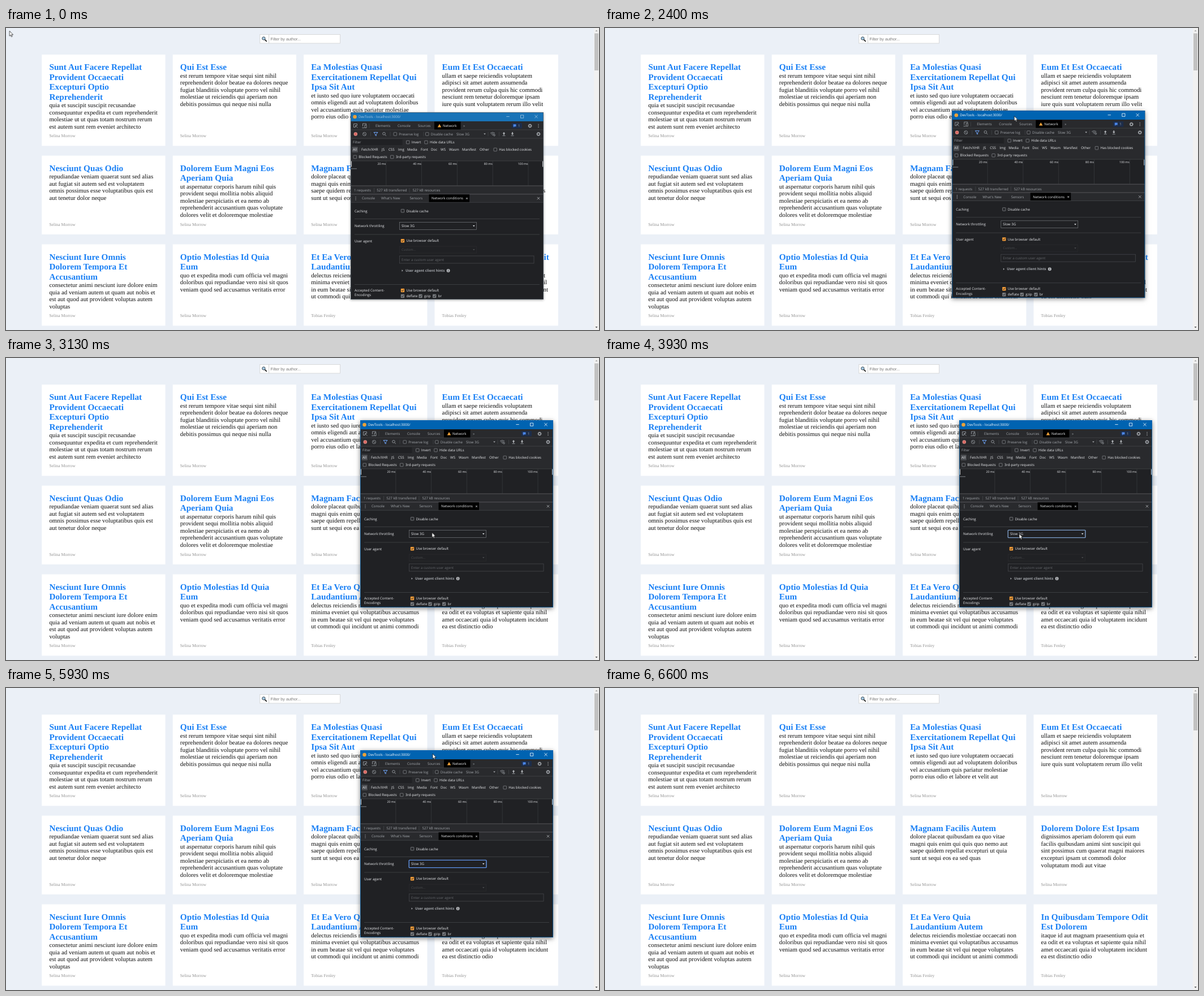
Recreate the animation shown at these times as an HTML page. Size 1048x534 px, loop 8 s.

```html
<!DOCTYPE html>
<html lang="en">
<head>
<meta charset="utf-8">
<title>Post list</title>
<style>
html, body { margin: 0; width: 100%; height: 100%; overflow: hidden; background: #ebf0f7; }
svg { position: absolute; left: 0; top: 0; display: block; }
text { text-rendering: geometricPrecision; white-space: pre; }

#page { font-family: "Liberation Serif", "Times New Roman", serif; }
.title { font-size: 15.28px; font-weight: bold; fill: #1a80f5; }
.body { font-size: 10.92px; fill: #111; }
.author { font-size: 7.7px; fill: #929292; }
.hint { font: 7.2px "Liberation Sans", Arial, sans-serif; fill: #777; }

#win, #win svg { width: 341px; height: 331px; }
#win { position: absolute; left: 609px; top: 149px; background: #202124; }
#win text { font: 6.15px "Open Sans", "Noto Sans", sans-serif; fill: #e8eaed; }
#win .dim { fill: #a3a7ac; }
#win .off { fill: #63666a; }
#win .it { fill: #4b4d50; font-style: italic; }
#win .bold { fill: #a3a7ac; font-weight: bold; }
#win .ms { font-size: 5.3px; text-anchor: end; }
#win .cap { fill: currentColor; }
.ico { fill: none; stroke: #a3a7ac; stroke-width: .8; }
.cur { position: absolute; left: 0; top: 0; width: 20px; height: 20px; overflow: visible; }

/* One tick is 1/120 of the loop (66.67 ms). */
#win, #bar, #frame, #ring, #list, #cursor, #arrow, #beam { animation: 8s step-end -5ms infinite; }
#win { animation-name: drag, glow; }
#bar { animation-name: caption; }
#frame { animation-name: frame; }
#ring { animation-name: ring; }
#list { animation-name: list; }
#cursor { animation-name: pointer; }
#arrow { animation-name: arrow; }
#beam { animation-name: beam; }

@keyframes drag {
  0% { transform: translate(0, 0); }
  28.333% { transform: translate(0, 0); animation-timing-function: steps(2); }
  30% { transform: translate(4.3px, -2.8px); animation-timing-function: steps(2); }
  31.667% { transform: translate(9px, -16px); animation-timing-function: steps(2); }
  33.333% { transform: translate(15px, -34px); }
  34.167% { transform: translate(17px, -39px); }
  77.5% { transform: translate(92px, -24px); }
  78.333% { transform: translate(197.7px, -16.2px); }
  79.167% { transform: translate(296px, -34px); }
  80% { transform: translate(376px, -60px); }
  80.833% { transform: translate(424px, -78px); }
  81.667% { transform: translate(437px, -84px); }
  82.5%, 100% { transform: translate(500px, -84px); }
}
@keyframes pointer {
  0% { transform: translate(6.2px, 5.2px); }
  3.333% { transform: translate(6.2px, 5.2px); animation-timing-function: steps(4); }
  6.667% { transform: translate(112px, 27px); animation-timing-function: steps(5); }
  10.833% { transform: translate(540px, 106px); animation-timing-function: steps(4); }
  14.167% { transform: translate(699px, 138px); }
  15% { transform: translate(701.5px, 143px); animation-timing-function: steps(2); }
  16.667% { transform: translate(692px, 156px); animation-timing-function: steps(5); }
  20.833% { transform: translate(908px, 159px); animation-timing-function: steps(4); }
  24.167% { transform: translate(719px, 158.4px); }
  28.333% { transform: translate(719px, 158.4px); animation-timing-function: steps(2); }
  30% { transform: translate(723.3px, 155.6px); animation-timing-function: steps(2); }
  31.667% { transform: translate(728px, 142.4px); animation-timing-function: steps(2); }
  33.333% { transform: translate(734px, 124.4px); }
  34.167% { transform: translate(736px, 119.4px); }
  35% { transform: translate(736px, 119.4px); animation-timing-function: steps(4); }
  38.333% { transform: translate(752px, 299px); }
  39.167% { transform: translate(752.8px, 308.5px); animation-timing-function: steps(6); }
  44.167% { transform: translate(741px, 317px); animation-timing-function: steps(5); }
  48.333% { transform: translate(732px, 310.8px); }
  67.5% { transform: translate(732px, 310.8px); animation-timing-function: steps(3); }
  70% { transform: translate(709px, 246px); animation-timing-function: steps(5); }
  74.167% { transform: translate(754px, 116.2px); }
  77.5% { transform: translate(829px, 131.2px); }
  78.333% { transform: translate(934.5px, 139px); }
  79.167% { transform: translate(1033px, 121px); }
  80%, 100% { transform: translate(1113px, 95px); }
}
@keyframes arrow { 0% { opacity: 1; } 13.333% { opacity: 0; } 16.667%, 100% { opacity: 1; } }
@keyframes beam { 0% { opacity: 0; } 13.333% { opacity: 1; } 16.667%, 100% { opacity: 0; } }
@keyframes caption { 0% { color: #a8cbe6; fill: #1973b7; } 28.333%, 100% { color: #fff; fill: #0063b1; } }
@keyframes frame { 0% { stroke: #56616b; } 28.333%, 100% { stroke: #0063b1; } }
@keyframes glow {
  0% { box-shadow: 0 1px 4px rgba(0, 0, 0, .4); }
  28.333%, 100% { box-shadow: 0 2px 8px rgba(0, 0, 0, .5); }
}
@keyframes ring {
  0% { stroke: transparent; }
  49.167% { stroke: #7d9fcb; }
  60.833%, 100% { stroke: #5f94ec; }
}
@keyframes list { 0% { opacity: 0; } 50% { opacity: .55; } 50.833% { opacity: 1; } 59.167%, 100% { opacity: 0; } }
</style>
</head>
<body>
<svg id="page" width="1048" height="534"></svg>
<div id="win"></div>
<div id="cursor" class="cur">
  <svg id="arrow" class="cur"><path d="M0 0V9L2 7.2 3.4 10.3 4.9 9.6 3.5 6.6H6.3Z" fill="#fff" stroke="#000" stroke-width=".7"/></svg>
  <svg id="beam" class="cur"><path d="M-2 -5H2M0 -5V5M-2 5H2" fill="none" stroke="#222" stroke-width=".8"/></svg>
</div>
<script>
const $ = id => document.getElementById(id);
const text = (x, y, s, cls = '') => `<text x="${x}" y="${y}" class="${cls}">${s}</text>`;
const rect = (x, y, w, h, fill, more = '') =>
  `<rect x="${x}" y="${y}" width="${w}" height="${h}" fill="${fill}" ${more}/>`;
const dot = (x, y, r, fill) => `<circle cx="${x}" cy="${y}" r="${r}" fill="${fill}"/>`;
const path = (d, more = 'class="ico"') => `<path d="${d}" ${more}/>`;
const solid = fill => `fill="${fill}"`;

// Page
const people = ['Selina Morrow', 'Tobias Fenley'];
const rows = [
  { y: 47, h: 161.4, cards: [
    ['Sunt Aut Facere Repellat|Provident Occaecati|Excepturi Optio|Reprehenderit', 'quia et suscipit suscipit recusandae|consequuntur expedita et cum reprehenderit|molestiae ut ut quas totam nostrum rerum|est autem sunt rem eveniet architecto', 0],
    ['Qui Est Esse', 'est rerum tempore vitae sequi sint nihil|reprehenderit dolor beatae ea dolores neque|fugiat blanditiis voluptate porro vel nihil|molestiae ut reiciendis qui aperiam non|debitis possimus qui neque nisi nulla', 0],
    ['Ea Molestias Quasi|Exercitationem Repellat Qui|Ipsa Sit Aut', 'et iusto sed quo iure voluptatem occaecati|omnis eligendi aut ad voluptatem doloribus|vel accusantium quis pariatur molestiae|porro eius odio et labore et velit aut', 0],
    ['Eum Et Est Occaecati', 'ullam et saepe reiciendis voluptatem|adipisci sit amet autem assumenda|provident rerum culpa quis hic commodi|nesciunt rem tenetur doloremque ipsam|iure quis sunt voluptatem rerum illo velit', 0]] },
  { y: 225.7, h: 139.3, cards: [
    ['Nesciunt Quas Odio', 'repudiandae veniam quaerat sunt sed alias|aut fugiat sit autem sed est voluptatem|omnis possimus esse voluptatibus quis est|aut tenetur dolor neque', 0],
    ['Dolorem Eum Magni Eos|Aperiam Quia', 'ut aspernatur corporis harum nihil quis|provident sequi mollitia nobis aliquid|molestiae perspiciatis et ea nemo ab|reprehenderit accusantium quas voluptate|dolores velit et doloremque molestiae', 0],
    ['Magnam Facilis Autem', 'dolore placeat quibusdam ea quo vitae|magni quis enim qui quis quo nemo aut|saepe quidem repellat excepturi ut quia|sunt ut sequi eos ea sed quas', 0],
    ['Dolorem Dolore Est Ipsam', 'dignissimos aperiam dolorem qui eum|facilis quibusdam animi sint suscipit qui|sint possimus cum quaerat magni maiores|excepturi ipsam ut commodi dolor|voluptatum modi aut vitae', 0]] },
  { y: 382.5, h: 143.9, cards: [
    ['Nesciunt Iure Omnis|Dolorem Tempora Et|Accusantium', 'consectetur animi nesciunt iure dolore enim|quia ad veniam autem ut quam aut nobis et|est aut quod aut provident voluptas autem|voluptas', 0],
    ['Optio Molestias Id Quia|Eum', 'quo et expedita modi cum officia vel magni|doloribus qui repudiandae vero nisi sit quos|veniam quod sed accusamus veritatis error', 0],
    ['Et Ea Vero Quia|Laudantium Autem', 'delectus reiciendis molestiae occaecati non|minima eveniet qui voluptatibus accusamus|in eum beatae sit vel qui neque voluptates|ut commodi qui incidunt ut animi commodi', 1],
    ['In Quibusdam Tempore Odit|Est Dolorem', 'itaque id aut magnam praesentium quia et|ea odit et ea voluptas et sapiente quia nihil|amet occaecati quia id voluptatem incidunt|ea est distinctio odio', 1]] },
];

function card(x, top, h, [title, body, who]) {
  const heads = title.split('|'), tx = x + 13.1, y = top + 27;
  const by = top + 13.1 + heads.length * 17.5 + 10;
  return rect(x, top, 218.3, h, '#fff') +
    heads.map((s, i) => text(tx, y + i * 17.5, s, 'title')).join('') +
    body.split('|').map((s, i) => text(tx, by + i * 12.55, s, 'body')).join('') +
    text(tx, top + h - 15, people[who], 'author');
}

$('page').innerHTML =
  rect(448.8, 11.4, 16, 15.6, '#fff', 'stroke="#ccc" stroke-width=".7"') +
  rect(464.8, 11.4, 125.6, 15.6, '#fff', 'stroke="#ccc" stroke-width=".7"') +
  path('M457.5 20.6L460.3 23.4', 'stroke="#222" stroke-width="1.8" stroke-linecap="round"') +
  '<circle cx="455.4" cy="18.4" r="2.7" fill="#a9cde8" stroke="#34444f" stroke-width="1"/>' +
  text(467.4, 21.8, 'Filter by author...', 'hint') +
  rows.map(r => r.cards.map((c, i) => card(63.3 + 231.4 * i, r.y, r.h, c)).join('')).join('') +
  rect(1039, 0, 9, 534, '#f1f1f1') + rect(1040, 9.5, 7, 65.5, '#c1c1c1') +
  path('M1041.5 6L1043.5 3.6 1045.5 6Z', solid('#a3a3a3')) +
  path('M1041.5 528L1043.5 530.4 1045.5 528Z', solid('#505050'));

// Tool window: y is the middle of the line of text
const label = (x, y, s, cls) => text(x, y + 2.2, s, cls);
const labels = (y, cls, ...items) => items.map(([x, s]) => label(x, y, s, cls)).join('');
const box = (x, y, mark = '') => mark
  ? rect(x - 3.2, y - 3.2, 6.4, 6.4, mark, 'rx="1"') +
    path(`M${x - 1.9} ${y}l1.4 1.5 2.4 -3`, 'fill="none" stroke="#202124" stroke-width="1"')
  : rect(x - 2.8, y - 2.8, 5.6, 5.6, '#292a2d', 'rx=".8" stroke="#8b8e92" stroke-width=".7"');
const check = (x, y, s, mark, cls) => box(x, y, mark) + label(x + 6.5, y, s, cls);
const line = (x1, y1, x2, y2, c = '#47494c') =>
  path(`M${x1} ${y1}L${x2} ${y2}`, `stroke="${c}" stroke-width=".7"`);
const seps = (y, ...xs) => xs.map(x => line(x, y - 4, x, y + 4)).join('');
const gear = (x, y) => `<g class="ico"><circle cx="${x}" cy="${y}" r="2.2" stroke-width="1.4"/>` +
  `<circle cx="${x}" cy="${y}" r="3.2" stroke-dasharray="1.25 1.26"/></g>`;
const dots = (x, y) => [-2.5, 0, 2.5].map(d => dot(x, y + d, .65, '#b5b8bc')).join('');
const cross = (x, y, r, c) => path(`M${x - r} ${y - r}l${2 * r} ${2 * r}m0 ${-2 * r}l${-2 * r} ${2 * r}`,
  `fill="none" stroke="${c}" stroke-width=".8"`);
const caret = (x, y, c) => path(`M${x - 1.8} ${y - 1}h3.6l-1.8 2.2Z`, solid(c));
const field = (x, y, w, h, c) => rect(x, y, w, h, '#202124', `stroke="${c}" stroke-width=".7"`);
const orange = '#f29b38', grey = '#76797d', pale = '#b5b8bc';

const caption = '<g id="bar">' + rect(0, 0, 341, 16, 'inherit').replace('fill="inherit"', '') +
  dot(7.5, 8, 3.3, '#e8a13a') + label(14, 7.8, 'DevTools - localhost:3000/', 'cap') +
  path('M275.3 7.6h5.4M300.5 5h5.2v5.2h-5.2ZM325.4 5l5.2 5.2m0 -5.2l-5.2 5.2',
    'fill="none" stroke="currentColor" stroke-width=".8"') + '</g>';

const tabs = rect(0, 16, 341, 114, '#292a2d') + line(0, 31, 341, 31) +
  path('M11.5 23.5v-3h-6v6h3M8.5 23.5l4 4m-4 -1.2v-2.8h2.8') +
  path('M21.5 25v-5h6v2M20.3 27.5h4M25 22.5h3v5h-3Z') + seps(24, 33) +
  labels(24, 'dim', [44, 'Elements'], [83, 'Console'], [119, 'Sources'], [199, '»']) +
  rect(148, 16.5, 46.5, 14, '#000') + path('M157 20.8l3.2 5.6h-6.4Z', solid('#f2a33a')) +
  label(163, 24, 'Network') +
  rect(284.5, 19, 18.5, 9.5, '#1d2d4a', 'rx="1.2"') +
  path('M287.5 21.3h5v4h-3l-1.5 1.5v-1.5h-.5Z', solid('#4b86e8')) + label(296, 23.9, '1', 'dim') +
  gear(317, 24) + dots(332, 24);

const tools = line(0, 46, 341, 46) + dot(8.8, 38.5, 3.2, '#e4908b') + dot(8.8, 38.5, 2.2, '#d8655f') +
  '<circle cx="24.5" cy="38.5" r="3" class="ico"/>' + path('M22.4 36.4l4.2 4.2') +
  seps(38.5, 35.5, 70, 129) +
  path('M41 35.5h7l-2.7 3.4v2.8l-1.6 -.8v-2Z', 'fill="none" stroke="#6ea3f5" stroke-width="1"') +
  '<circle cx="59" cy="37.8" r="2.3" class="ico"/>' + path('M60.6 39.5l2.4 2.4') +
  check(78.8, 38.5, 'Preserve log', '', 'dim') + check(135.3, 38.5, 'Disable cache', '', 'dim') +
  label(187, 38.5, 'Slow 3G', 'dim') + caret(237, 38.4, pale) + seps(38.5, 243, 262.5) +
  path('M247 37q4 -3 8 0M248.6 38.8q2.4 -1.8 4.8 0M250.2 40.4h1.6') +
  '<circle cx="254" cy="40.5" r="1.4" class="ico"/>' +
  path('M271 35l2.3 2.8h-1.5v2.4h-1.6v-2.4h-1.5ZM286 40.2l2.3 -2.8h-1.5v-2.4h-1.6v2.4h-1.5Z', solid(pale)) +
  path('M268.5 41.5h5M283.5 41.5h5') + gear(332, 38.5);

const filters = rect(2.5, 48, 89, 10, '#202124') + label(4, 53, 'Filter', 'dim') +
  check(101.3, 53, 'Invert') + check(133.5, 53, 'Hide data URLs') +
  rect(2.6, 61, 10.4, 10, '#4a4c50', 'rx="1.2"') +
  labels(66, '', [4, 'All'], [19, 'Fetch/XHR'], [55, 'JS'], [67, 'CSS'], [84, 'Img'], [100, 'Media'],
    [124, 'Font'], [142, 'Doc'], [159, 'WS'], [174, 'Wasm'], [197, 'Manifest'], [228, 'Other']) +
  seps(66, 16) + check(255.7, 66, 'Has blocked cookies') +
  check(7.8, 79, 'Blocked Requests') + check(73.3, 79, '3rd-party requests');

const chart = rect(0, 86, 341, 44, '#202124') + line(0, 86, 341, 86) +
  [1, 2, 3, 4, 5].map(i => line(62.8 * i, 86, 62.8 * i, 129.5, '#3c3e41') +
    text(62.8 * i - .5, 93.2, i * 20 + ' ms', 'ms')).join('') +
  rect(.8, 86.5, 1.2, 10, '#d5d7da') + rect(339, 86.5, 1.2, 10, '#d5d7da') +
  line(1, 99.8, 11, 99.8, '#a9adb2') +
  rect(0, 130, 341, 29.3, '#292a2d') + line(0, 130, 341, 130, '#6a6c6f') +
  labels(138.2, 'dim', [6, '1 requests'], [46.3, '527 kB transferred'], [109.5, '527 kB resources']) +
  seps(138.2, 41.5, 104);

const drawer = line(0, 144.8, 341, 144.8, '#6a6c6f') + dots(9, 152.3) +
  labels(152.2, 'dim', [20, 'Console'], [54, "What's New"], [104.5, 'Sensors']) +
  rect(138.5, 145.2, 71.5, 14, '#000') + label(143, 152.2, 'Network conditions') +
  cross(205.5, 152.4, 1.4, '#e8eaed') + cross(332, 152.2, 2.2, pale) + line(0, 159.3, 341, 159.3);

const panel = labels(174.5, '', [7, 'Caching']) + check(92, 174.3, 'Disable cache') +
  [188.5, 216, 304.5].map(y => line(7, y, 334, y)).join('') +
  label(7, 201, 'Network throttling') + field(86.5, 194.6, 136, 12.8, '#75787c') +
  rect(86.2, 194.3, 136.8, 13.4, 'none', 'id="ring" rx="1" stroke-width="1.3"') +
  label(90, 201, 'Slow 3G') + caret(217.8, 201, '#e8eaed') +
  label(7, 228, 'User agent') + check(92, 227.2, 'Use browser default', orange) +
  field(86.5, 237, 136, 12, '#2b2c2f') + label(90, 243, 'Custom...', 'it') + caret(217.8, 243, '#4b4d50') +
  field(86.5, 254, 237.5, 13, '#4a4c50') + label(90, 260.5, 'Enter a custom user agent', 'off') +
  path('M90.6 278.2l2 1.8 -2 1.8Z', solid(pale)) + label(97, 280, 'User agent client hints', 'bold') +
  dot(172.6, 280, 3, pale) + path('M172.6 279.5v2.2M172.6 277.8v.9', 'stroke="#202124" stroke-width=".9"') +
  label(7, 314.6, 'Accepted Content-') + label(7, 323.2, 'Encodings') +
  check(92, 315, 'Use browser default', orange) +
  [[92, 'deflate'], [123.5, 'gzip'], [148.2, 'br']].map(([x, s]) => check(x, 325, s, grey)).join('');

const options = ['Disabled', '  No throttling', 'Presets', '  Fast 3G', '  Slow 3G', '  Offline', 'Custom', '  Add...'];
const list = '<g id="list">' + field(86.5, 208, 136, 76, '#75787c') +
  rect(87, 246, 135, 9.5, '#4b6ea8') +
  options.map((s, i) => label(90 + (s[0] === ' ' ? 6 : 0), 212.8 + 9.5 * i, s.trim(),
    s[0] === ' ' ? '' : 'bold')).join('') + '</g>';

$('win').innerHTML = '<svg>' + caption + tabs + tools + filters + chart + drawer + panel + list +
  rect(.3, .3, 340.4, 330.4, 'none', 'id="frame" stroke-width=".8"') + '</svg>';
</script>
</body>
</html>
```
